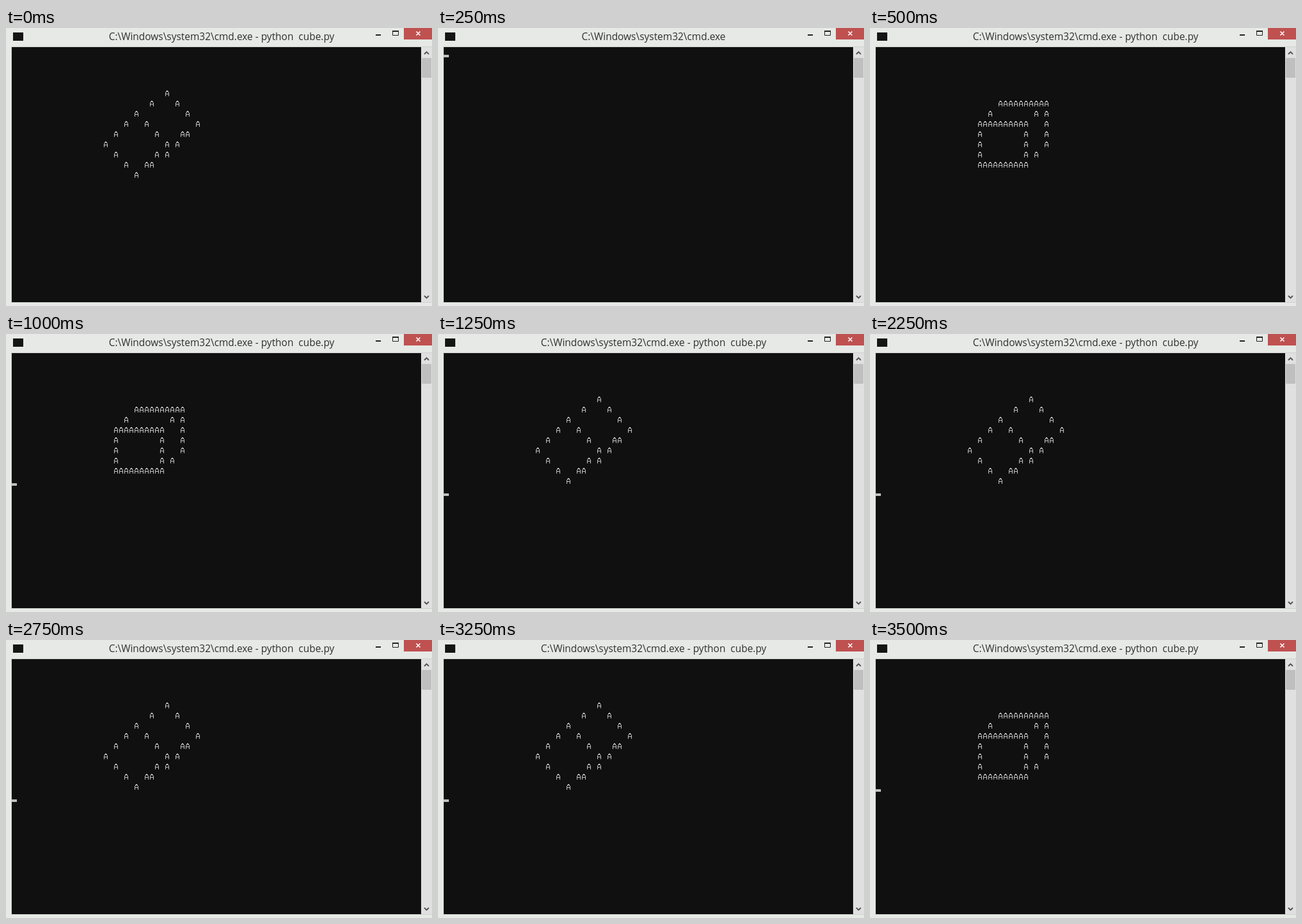
Recreate the animation shown at these times as an HTML page with a canvas. Size 666x436 px, loop 3.75 s.

```html
<!DOCTYPE html>
<html lang="en">
<head>
<meta charset="utf-8">
<title>Console cube</title>
<style>
  html, body { margin: 0; width: 100%; height: 100%; overflow: hidden; background: #e6e9e5; }
  svg, canvas { position: absolute; display: block; }
  svg { left: 0; top: 0; }
  canvas { left: 9px; top: 30px; }
  text { font-family: "Open Sans", "Noto Sans", sans-serif; font-size: 15.45px; fill: #303030; white-space: pre; }
</style>
</head>
<body>
<svg width="666" height="436" viewBox="0 0 666 436">
  <rect width="666" height="436" fill="#e6e9e5"/>
  <rect x="8" y="29" width="658" height="402" fill="#cfd1ce"/>
  <rect x="11" y="7" width="16" height="13" fill="#151515"/>
  <text id="title" x="337" y="19" text-anchor="middle" xml:space="preserve"></text>

  <rect x="578" y="10" width="8" height="2" fill="#222"/>
  <path d="M604.5 5v6.5h9V5" fill="none" stroke="#222"/>
  <rect x="604" y="4" width="10" height="2" fill="#222"/>
  <rect x="622" width="44" height="18" fill="#bf5151"/>
  <path d="M641.5 5.5l6 6m0-6l-6 6" stroke="#fff" stroke-width="1.6"/>

  <rect x="649" y="30" width="17" height="400" fill="#e0e0e0"/>
  <rect x="650" y="47" width="15" height="31" fill="#bfbfbf"/>
  <path d="M654 41l3.5-3.5L661 41M654 420l3.5 3.5L661 420" fill="none" stroke="#505050" stroke-width="1.8"/>
</svg>
<canvas id="screen" width="640" height="400"></canvas>

<script>
const LOOP = 3750, STEP = 250;
const CELL_W = 8, CELL_H = 16;
const SHELL = 'C:\\Windows\\system32\\cmd.exe';
const TITLE = SHELL + ' - python  cube.py';

const pad = n => ' '.repeat(n);
const edge = 'A'.repeat(10);

const tilted = {
  top: 4,
  left: 18,
  rows: [
    '            A',
    '         A    A',
    '      A         A',
    '    A   A         A',
    '  A       A    AA',
    'A           A A',
    '  A       A A',
    '    A   AA',
    '      A'
  ]
};
const upright = {
  top: 5,
  left: 20,
  rows: [
    pad(4) + edge,
    '  A' + pad(8) + 'A A',
    edge + '   A',
    'A' + pad(8) + 'A   A',
    'A' + pad(8) + 'A   A',
    'A' + pad(8) + 'A A',
    edge
  ]
};
const blank = { top: 0, left: 0, rows: [] };

// Console bitmap letter, six pixels wide
const glyph = [
  '..##..',
  '.####.',
  '.#..#.',
  '#....#',
  '#....#',
  '######',
  '#....#',
  '#....#',
  '#....#'
];

const title = document.getElementById('title');
const ctx = document.getElementById('screen').getContext('2d');

function drawLetter(col, row) {
  glyph.forEach((line, y) => [...line].forEach((dot, x) => {
    if (dot === '#') ctx.fillRect(col * CELL_W + x, row * CELL_H + 4 + y, 1, 1);
  }));
}

function drawScreen(shape, cursor) {
  ctx.fillStyle = '#101010';
  ctx.fillRect(0, 0, 640, 400);
  ctx.fillStyle = '#c0c0c0';
  shape.rows.forEach((line, r) => [...line].forEach((ch, c) => {
    if (ch === 'A') drawLetter(shape.left + c, shape.top + r);
  }));
  if (cursor) {
    const row = shape.top + shape.rows.length;
    ctx.fillRect(0, row * CELL_H + 12, CELL_W, 4);
  }
}

function show(step) {
  const clearing = step === 1;
  const shape = clearing ? blank : step === 0 || step % 2 ? tilted : upright;
  title.textContent = clearing ? SHELL : TITLE;
  drawScreen(shape, clearing || step > 2);
}

let shown = -1;
const start = performance.now();

function tick() {
  const step = Math.floor(((performance.now() - start) % LOOP) / STEP);
  if (step !== shown) show(shown = step);
  requestAnimationFrame(tick);
}
tick();
</script>
</body>
</html>
```
